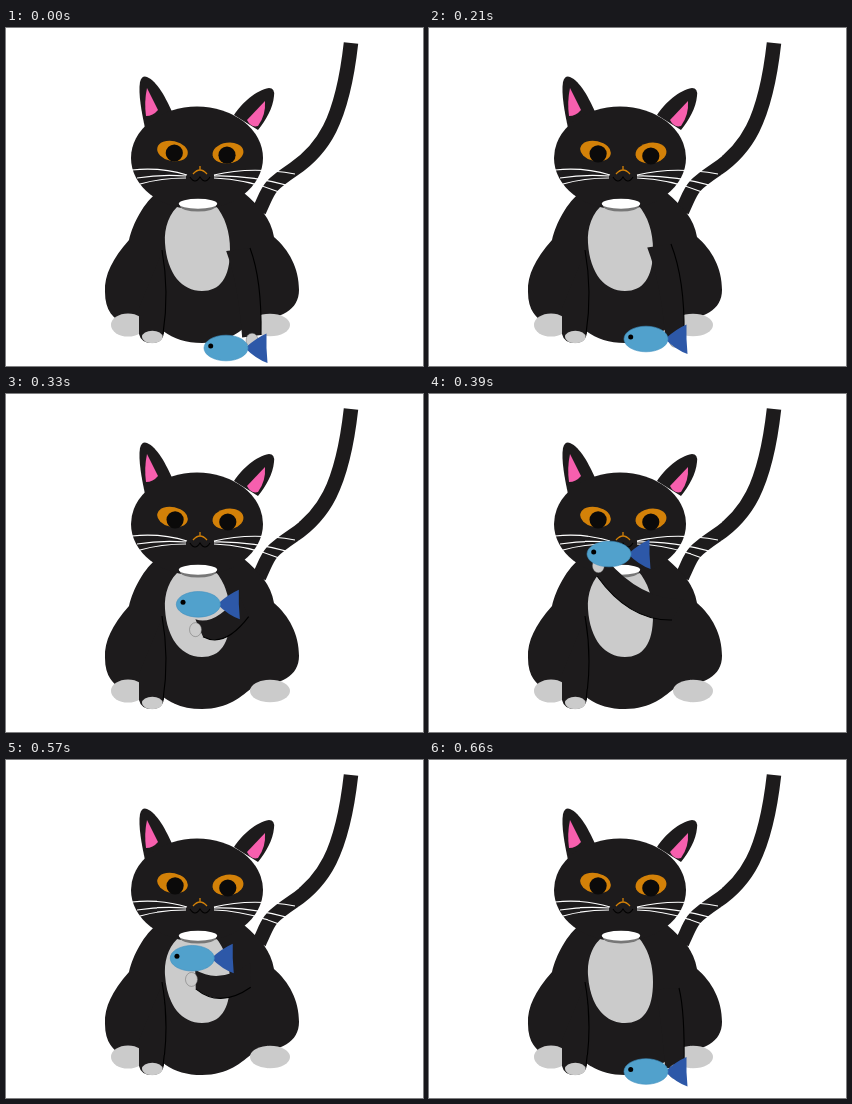
Animation of 417 by 338 pixels, one loop 750 ms. Source, as an HTML page:

```html
<!DOCTYPE html>
<html lang="en">
<head>
<meta charset="utf-8">
<title>Cat eating a fish</title>
<style>
  html, body { margin: 0; width: 100%; height: 100%; overflow: hidden; background: #fff; }
  svg { display: block; width: 417px; height: 338px; }
  .fur { fill: #1d1b1c; }
  .paw { fill: #cbcbcb; }
  .line { fill: none; stroke: #000; stroke-width: 1.1; }
  .whiskers { fill: none; stroke: #fff; stroke-width: 1.2; }
</style>
</head>
<body>
<svg viewBox="0 0 417 338">
  <path d="M345 15C336 95 316 122 288 141S264 160 253 183" fill="none" stroke="#1d1b1c" stroke-width="14.5"/>
  <g class="fur">
    <path d="M152 164C138 174 127 195 123 212C107 230 98 247 99 264C99 282 107 292 120 296L157 303C168 311 180 315 196 315C222 315 236 302 247 293C275 291 293 282 293 262C293 240 283 222 268 209C265 190 253 178 238 165Z"/>
    <path d="M139 100C136 86 132 66 134 54Q136 47 141 49C151 53 160 70 167 86Z"/>
    <path d="M228 87C236 75 250 62 263 60Q269 60 268 68C267 80 260 92 252 102Z"/>
  </g>
  <path class="paw" d="M175 176C163 184 158 200 159 215C161 246 176 263 196 263C214 263 224 250 224 222C224 204 219 188 209 177Z"/>
  <ellipse class="fur" cx="191" cy="130" rx="66" ry="51.5"/>
  <g fill="#f75fae">
    <path d="M141 60L152 82Q147 88 140 88Q138 74 141 60Z"/>
    <path d="M259 73Q260 87 252 98Q245 100 241 92Z"/>
  </g>
  <g fill="#d38108">
    <ellipse cx="166.5" cy="123" rx="15.5" ry="10" transform="rotate(12 166.5 123)"/>
    <ellipse cx="222" cy="125" rx="15.5" ry="10.3" transform="rotate(-8 222 125)"/>
  </g>
  <g id="pupils" fill="#0b0a0a">
    <circle cx="168.3" cy="125" r="8.6"/>
    <circle cx="221" cy="127.2" r="8.6"/>
  </g>
  <path d="M187 146Q194 138 201 146M194 138V142" fill="none" stroke="#d38108" stroke-width="1.3"/>
  <path class="line" d="M184 149Q189 157 194 149Q199 157 204 149"/>
  <path class="whiskers" d="M126 142Q155 139 181 147M131 150Q155 146 180 148M134 156Q155 150 180 150M208 147Q245 138 289 146M208 148Q244 147 284 158M208 150Q240 151 273 164"/>
  <ellipse cx="192" cy="178" rx="18" ry="5.5" fill="#777"/>
  <ellipse cx="192" cy="175.7" rx="19.2" ry="5" fill="#fff"/>
  <ellipse class="paw" cx="122" cy="297" rx="17" ry="11.5"/>
  <ellipse class="paw" cx="264" cy="297" rx="20" ry="11.3"/>
  <path class="fur" d="M133 280V306Q135 315 146 315Q157 315 158 304C161 280 161 250 156 224Z"/>
  <path class="line" d="M156 222C161 250 161 280 157 306"/>
  <ellipse class="paw" cx="146.3" cy="309" rx="10.3" ry="6.2"/>
  <path id="arm" class="fur"/>
  <path id="armEdge" class="line"/>
  <ellipse id="forepaw" class="paw" rx="6" ry="7" stroke="#555" stroke-width=".4"/>
  <g id="fish">
    <path d="M19 0Q30 -10 40.5 -14.5Q40 0 41.5 15Q30 11 19 0Z" fill="#2d58a8"/>
    <ellipse rx="22" ry="12.8" fill="#51a1cc" stroke="#3f8fc0" stroke-width=".6"/>
    <circle cx="-15.3" cy="-2" r="2.5"/>
  </g>
</svg>
<script>
const LOOP = 750, STEP = 30;

// lift: 0 = paw on the floor, 1 = paw at the mouth
const keys = [
  { at: 0,   lift: 0, fish: [220, 320],   shoulder: [244, 220] },
  { at: 210, lift: 0, fish: [217, 311],   shoulder: [242, 216] },
  { at: 390, lift: 1, fish: [180, 160],   shoulder: [243, 226] },
  { at: 510, lift: 1, fish: [175, 156],   shoulder: [244, 232] },
  { at: 540, lift: 1, fish: [176, 160.5], shoulder: [243, 227] },
  { at: 660, lift: 0, fish: [217, 311.5], shoulder: [250, 228] }
];
const floorArm = { elbow: [256, 252], wrist: [255, 307] };
const mouthArm = { elbow: [200, 227], wrist: [168, 182] };
const SAG = 22, ARM_WIDTH = 24, WRIST_WIDTH = 19;

const el = id => document.getElementById(id);
const mix = (a, b, k) => a + (b - a) * k;
const mixPoint = (a, b, k) => a.map((v, i) => mix(v, b[i], k));
const along = ([x, y], [dx, dy], d) => [x + dx * d, y + dy * d];
const move = (id, [x, y]) => el(id).setAttribute("transform", `translate(${x} ${y})`);

function drawArm(shoulder, lift) {
  // The arm hangs lower halfway between floor and mouth
  const joint = name =>
    along(mixPoint(floorArm[name], mouthArm[name], lift), [0, 1], SAG * Math.sin(Math.PI * lift));
  const elbow = joint("elbow"), wrist = joint("wrist");
  const dx = wrist[0] - shoulder[0], dy = wrist[1] - shoulder[1], length = Math.hypot(dx, dy);
  const forward = [dx / length, dy / length];
  const inward = [-forward[1], forward[0]];
  const inner = (point, width = ARM_WIDTH) => along(point, inward, width);

  const edge = `M${shoulder}Q${elbow} ${wrist}`;
  el("armEdge").setAttribute("d", edge);
  el("arm").setAttribute("d", `${edge}L${inner(wrist, WRIST_WIDTH)}Q${inner(elbow)} ${inner(shoulder)}Z`);
  move("forepaw", along(inner(wrist, WRIST_WIDTH / 2), forward, 4));
}

function draw(time) {
  const t = Math.min(Math.floor(time / STEP) * STEP, 660);
  const next = Math.max(1, keys.findIndex(key => key.at >= t));
  const a = keys[next - 1], b = keys[next];
  const k = (t - a.at) / (b.at - a.at);

  drawArm(mixPoint(a.shoulder, b.shoulder, k), mix(a.lift, b.lift, k));
  move("fish", mixPoint(a.fish, b.fish, k));
  const gaze = 0.8 * Math.min(t / 210, 1);
  move("pupils", [gaze, gaze]);
}

function tick() {
  draw(performance.now() % LOOP);
  requestAnimationFrame(tick);
}
tick();
</script>
</body>
</html>
```
